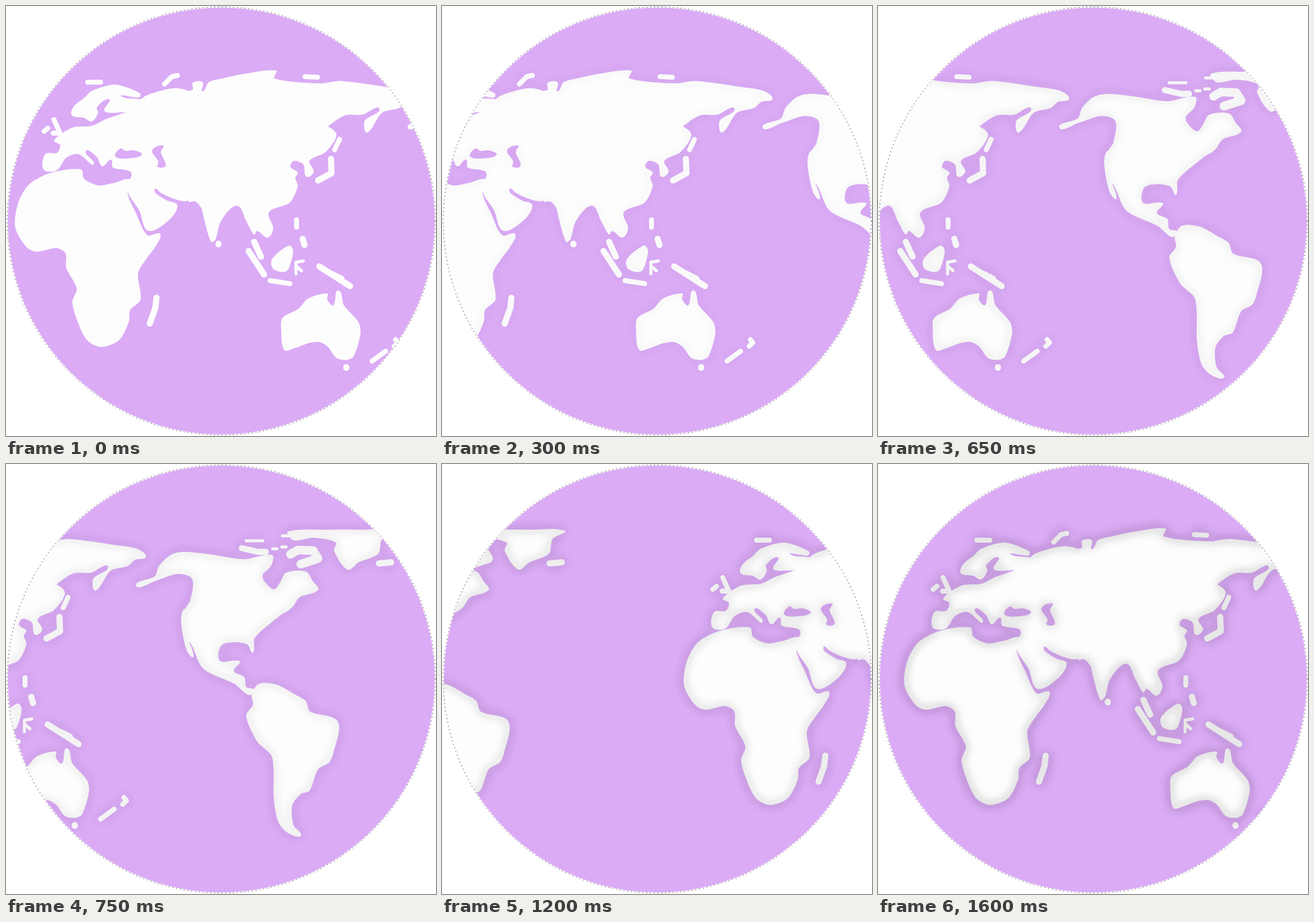
An HTML page for the animation above (1650 ms loop, 700 by 700 pixels).

```html
<!DOCTYPE html>
<html lang="en">
<head>
<meta charset="utf-8">
<title>Turning globe</title>
<style>
  html, body { margin: 0; width: 100%; height: 100%; overflow: hidden; background: #fff; }
  svg { display: block; width: 100vw; height: 100vh; }
  #land { fill: #fdfdfd; fill-rule: evenodd; }
  .isles { fill: none; stroke: #fdfdfd; stroke-linecap: round; stroke-linejoin: round; }
  #rim { fill: none; stroke: #000; stroke-width: 1; stroke-dasharray: 1.2 5; }
</style>
</head>
<body>
<svg viewBox="0 0 700 700">
  <defs>
    <clipPath id="disc"><circle cx="350.5" cy="350" r="347.5"/></clipPath>
    <!-- Soft shade on both sides of the coastline -->
    <filter id="coast" filterUnits="userSpaceOnUse" x="-40" y="60" width="2580" height="600" color-interpolation-filters="sRGB">
      <feGaussianBlur in="SourceAlpha" stdDeviation="9"/>
      <feComponentTransfer><feFuncA type="table" tableValues="0 .085 .09 .075 0"/></feComponentTransfer>
    </filter>
    <g id="land">
      <!-- Africa -->
      <path data-coast="72,272 122,266 127,281 150,292 176,288 204,283 198,305 212,338 230,373 251,371 243,392 229,411 215,435 219,478 202,495 200,514 184,544 155,555 133,545 119,520 108,482 115,460 98,426 97,403 82,394 50,400 33,392 15,360 20,320 38,290"/>
      <!-- Europe -->
      <path data-coast="107,178 110,164 128,149 140,138 178,128 218,142 217,149 188,147 222,153 230,166 172,174 160,170 168,152 148,165 150,174 140,188 127,182"/>
      <path data-coast="232,147 212,158 196,172 163,184 140,195 108,198 78,219 88,226 83,239 64,241 61,266 82,268 98,247 118,241 141,259 143,254 130,236 148,246 157,261 171,250 174,263 203,270 206,290 232,290/178,245 186,232 195,236 208,235 221,242 200,248"/>
      <!-- Asia -->
      <path data-coast="226,150 245,140 280,134 303,145 303,300 296,317 274,314 252,304 243,297 243,304 263,317 279,324 268,346 232,366 217,333 198,301 206,275 226,266/238,235 256,227 252,238 260,260 247,262 248,253"/>
      <path data-coast="295,206 295,140 304,136 304,125 320,124 320,139 330,124 352,118 390,110 440,105 437,118 510,126 545,122 620,132 655,138 670,151 652,156 640,166 612,174 588,206 584,187 608,167 580,177 552,178 524,196 515,206 400,206"/>
      <path data-coast="297,198 400,198 515,198 524,196 538,210 520,238 494,252 501,270 489,278 484,258 469,252 463,262 475,271 471,280 475,293 462,320 428,336 435,362 426,377 409,366 404,372 391,350 376,325 350,350 341,380 334,384 322,345 318,329 308,318 297,318"/>
      <path data-coast="433,412 460,390 467,396 465,413 456,432 435,428"/>
      <!-- Australia -->
      <path data-coast="448,528 450,508 476,493 492,476 523,468 523,478 533,487 541,463 550,487 574,515 577,533 566,570 555,576 538,573 524,555 510,547 492,549 470,557 453,560"/>
      <g class="isles" stroke-width="5">
        <path d="M484 415L472 417V436M473 424L481 431"/>
      </g>
      <g class="isles" stroke-width="8">
        <path d="M258 127L270 115L279 113M133 124H154M487 115L507 116M543 217L535 234M430 447L462 452M473 348V360M596 578L618 562M634 543L638 548L632 554"/>
        <path d="M78 185L88 207H77M62 204L68 199"/>
      </g>
      <g class="isles" stroke-width="10">
        <path d="M529 249L530 272L508 284M404 384L415 408M395 399L420 437M483 379L486 389M510 424L535 440L560 456M530 436L546 444M245 475L243 492L234 517M346 387V388M554 588V589"/>
      </g>
      <g transform="translate(442)">
        <!-- North America and Greenland -->
        <path data-coast="212,198 242,183 249,166 268,148 290,143 332,147 388,155 433,148 432,165 418,180 420,190 436,204 446,193 456,177 488,175 499,190 508,205 478,217 462,236 380,245 293,245 292,236 300,222 303,187 280,179 244,190"/>
        <path data-coast="285,255 292,235 380,230 462,235 447,246 405,283 402,307 393,294 370,290 350,296 348,320 372,320 381,322 371,337 388,347 391,363 405,368 395,376 372,358 321,333 299,290 305,314 294,303"/>
        <path data-coast="459,110 520,107 579,107 632,109 612,122 606,146 574,160 556,172 534,141 537,128 500,120 468,124"/>
        <!-- South America -->
        <path data-coast="400,376 411,358 440,359 472,376 488,386 495,403 540,419 533,470 526,486 508,497 494,532 480,537 466,556 468,588 480,605 458,600 443,582 436,545 433,477 409,452 391,410 402,392"/>
        <path class="isles" stroke-width="5" d="M391 125H418M434 138H441M449 135H456M450 117H460"/>
        <path class="isles" stroke-width="10" d="M384 137L410 143H423M607 162L627 160"/>
        <path class="isles" stroke-width="14" d="M463 147L475 140L500 141L508 154L480 163"/>
      </g>
    </g>
    <g id="world"><use href="#land"/><use href="#land" x="1253"/></g>
  </defs>
  <g clip-path="url(#disc)">
    <rect width="700" height="700" fill="#dbabf6"/>
    <g id="strip">
      <use href="#world"/>
      <g id="shade"><use href="#world" filter="url(#coast)"/></g>
    </g>
  </g>
  <circle id="rim" cx="350.5" cy="350" r="348.6"/>
</svg>
<script>
  const FRAME = 50, FRAMES = 33;

  // Closed smooth curve through the points; handles scale with each side
  function smooth(text) {
    const pts = text.split(' ').map(p => p.split(',').map(Number));
    const n = pts.length;
    const at = i => pts[(i + n) % n];
    const dir = i => {
      const [a, b] = [at(i - 1), at(i + 1)];
      const len = Math.hypot(b[0] - a[0], b[1] - a[1]) || 1;
      return [(b[0] - a[0]) / len, (b[1] - a[1]) / len];
    };
    let d = 'M' + pts[0];
    for (let i = 0; i < n; i++) {
      const p = at(i), q = at(i + 1), u = dir(i), v = dir(i + 1);
      const h = Math.hypot(q[0] - p[0], q[1] - p[1]) * 0.28;
      const c = [p[0] + u[0] * h, p[1] + u[1] * h, q[0] - v[0] * h, q[1] - v[1] * h];
      d += 'C' + c.map(k => k.toFixed(1)) + ',' + q;
    }
    return d + 'Z';
  }

  for (const path of document.querySelectorAll('[data-coast]')) {
    path.setAttribute('d', path.dataset.coast.split('/').map(smooth).join(''));
  }

  // [step, distance scrolled]
  const knots = [[0, 0], [6, 132], [10, 253], [15, 442], [19, 671], [24, 874], [32, 1225], [33, 1253]];
  const sides = knots.length - 1;
  const speed = i => {
    const k = (i + sides) % sides;
    return (knots[k + 1][1] - knots[k][1]) / (knots[k + 1][0] - knots[k][0]);
  };
  const slope = i => 2 / (1 / speed(i - 1) + 1 / speed(i));

  // Smooth, never reversing, and seamless across the loop
  function scrolled(step) {
    let i = 0;
    while (step >= knots[i + 1][0]) i++;
    const [x0, y0] = knots[i], [x1, y1] = knots[i + 1];
    const w = x1 - x0, s = (step - x0) / w, r = 1 - s;
    return y0 + (y1 - y0) * s * s * (3 - 2 * s) + w * s * r * (slope(i) * r - slope(i + 1) * s);
  }

  const strip = document.getElementById('strip');
  const shade = document.getElementById('shade');
  let last = -1;

  function draw(now) {
    const step = Math.floor(Math.max(now, 0) / FRAME) % FRAMES;
    if (step !== last) {
      last = step;
      strip.setAttribute('transform', `translate(${-scrolled(step).toFixed(1)})`);
      shade.setAttribute('opacity', (step / (FRAMES - 1)).toFixed(3));
    }
    requestAnimationFrame(draw);
  }
  draw(performance.now());
</script>
</body>
</html>
```
